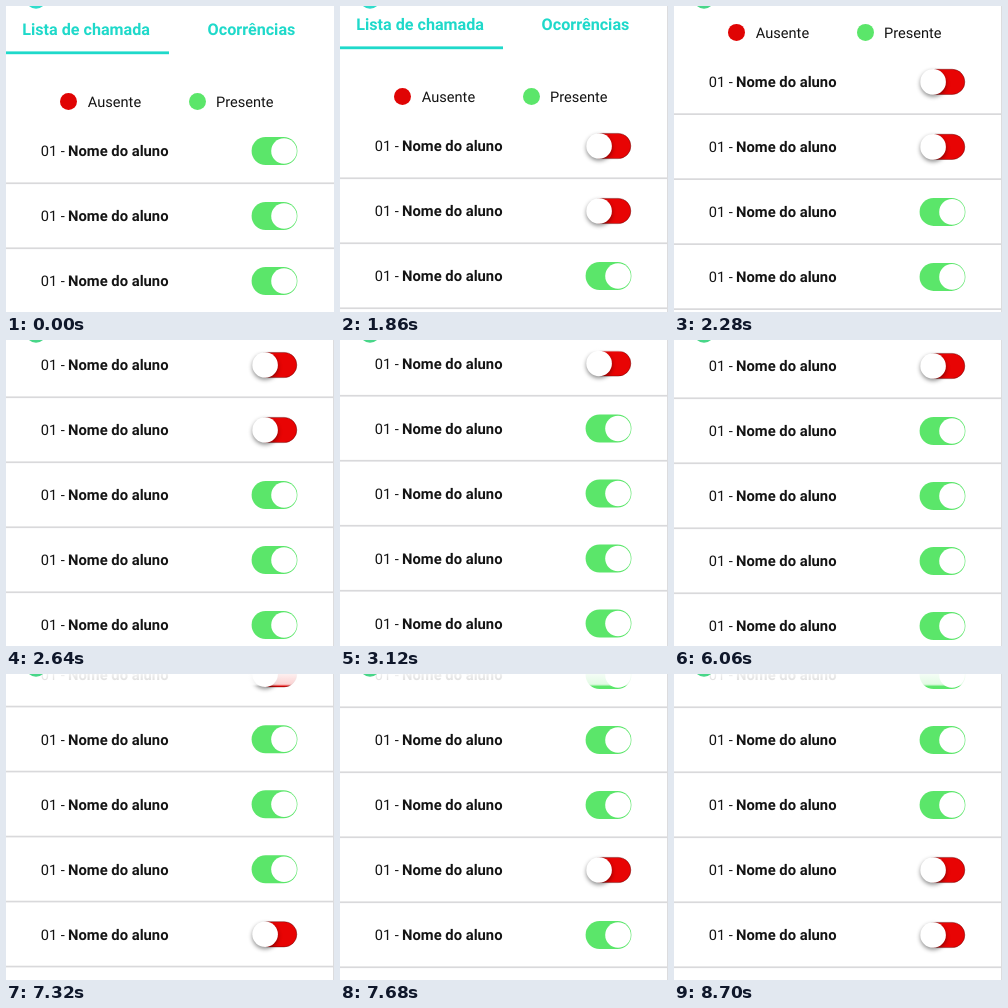
Write an HTML page that moves like this. It is 328 by 306 pixels and loops after 8760 ms.

```html
<!DOCTYPE html>
<html lang="pt">
<head>
<meta charset="utf-8">
<style>
  html, body { margin: 0; width: 100%; height: 100%; overflow: hidden; background: #fff; }
  svg { display: block; width: 328px; height: 306px; font: 14.6px Roboto, sans-serif; fill: #141414; text-rendering: geometricPrecision; }
  .name { font-size: 14.8px; font-weight: 700; }
  .tab { font-size: 16.15px; font-weight: 700; fill: #1fd9ca; }
</style>
</head>
<body>
<svg viewBox="0 0 328 306">
  <defs>
    <linearGradient id="fade" x2="0" y2="1">
      <stop offset="0" stop-color="#fff" stop-opacity=".94"/>
      <stop offset=".82" stop-color="#fff" stop-opacity=".82"/>
      <stop offset="1" stop-color="#fff" stop-opacity="0"/>
    </linearGradient>
  </defs>
  <g id="page">
    <text class="tab" x="16.2" y="28.6">Lista de chamada</text>
    <text class="tab" x="201.6" y="28.6">Ocorrências</text>
    <rect y="45.4" width="163" height="2.8" fill="#1fd9ca"/>
    <circle cx="62.5" cy="95.5" r="8.5" fill="#e00404"/>
    <text x="81.8" y="101">Ausente</text>
    <circle cx="191.5" cy="95.5" r="8.5" fill="#5be66a"/>
    <text x="210" y="101">Presente</text>
  </g>
  <rect width="328" height="12.5" fill="url(#fade)"/>
  <circle id="badge" cx="30" cy="-7.8" r="10.5"/>
  <rect id="edge" x="327" width="1" height="306" fill="#dcdcde"/>
</svg>
<script>
const LOOP = 8760, TICK = 60, ROWS = 9, PITCH = 65;
const GREEN = [91, 230, 106], RED = [232, 4, 4];

const ease = p => p * p * (3 - 2 * p);
const easeOut = p => 1 - (1 - p) ** 2;
const linear = p => p;

// time, scroll offset, easing towards this point
const scrollSteps = [
  [0, 0], [1800, 0], [1860, 5, linear], [2640, 120, ease], [2700, 121, linear],
  [3480, 238.5, ease], [6000, 238.5], [6060, 249, linear], [6120, 249],
  [6480, 270, easeOut], [7260, 270], [7320, 274.7, linear], [7680, 339, easeOut], [LOOP, 339]
];

// row: [start, end] of its switch to absent
const switches = { 0: [300, 600], 1: [1260, 1500], 2: [3720, 4020], 6: [6780, 7080], 7: [8100, 8460] };

const page = document.getElementById('page');
const badge = document.getElementById('badge');
const edge = document.getElementById('edge');

function add(parent, tag, attrs, text) {
  const el = document.createElementNS('http://www.w3.org/2000/svg', tag);
  for (const name in attrs) el.setAttribute(name, attrs[name]);
  if (text) el.textContent = text;
  return parent.appendChild(el);
}

const rows = Array.from({ length: ROWS }, (_, i) => {
  const g = add(page, 'g', { transform: `translate(0 ${145 + i * PITCH})` });
  add(g, 'text', { x: 34.8, y: 5.2 }, '01 -');
  add(g, 'text', { x: 62, y: 5.2, class: 'name' }, 'Nome do aluno');
  add(g, 'rect', { y: 31.4, width: 328, height: 1.7, fill: '#d9d9db' });
  const track = add(g, 'rect', { stroke: '#500', 'stroke-width': 0.7 });
  const knob = add(g, 'circle', { cy: 0, r: 12.8, fill: '#fff' });
  return { track, knob };
});

function scrollAt(t) {
  const i = Math.max(1, scrollSteps.findIndex(s => s[0] >= t));
  const [t0, a] = scrollSteps[i - 1], [t1, b, fn = linear] = scrollSteps[i];
  return a + (b - a) * fn((t - t0) / (t1 - t0));
}

function setSwitch({ track, knob }, p) {
  const color = GREEN.map((c, i) => Math.round(c + (RED[i] - c) * p));
  const left = 245.6 + 3.4 * p, right = 291.4 - 0.6 * p;
  const h = 28 - 2.8 * p;
  const box = {
    x: left, y: -h / 2, width: right - left, height: h, rx: h / 2,
    fill: `rgb(${color})`, 'stroke-opacity': 0.6 * p
  };
  for (const name in box) track.setAttribute(name, box[name]);
  knob.setAttribute('cx', 278 - 18.9 * p);
  knob.style.filter = p ? `drop-shadow(0.5px 2px 2px rgba(0,0,0,${0.45 * p}))` : 'none';
}

function draw(now) {
  const t = Math.floor((now % LOOP) / TICK) * TICK;
  page.setAttribute('transform', `translate(0 ${-scrollAt(t)})`);
  rows.forEach((row, i) => {
    const [from, to] = switches[i] || [LOOP, LOOP + 1];
    setSwitch(row, ease(Math.min(1, Math.max(0, (t - from) / (to - from)))));
  });
  badge.setAttribute('fill', t < 2100 ? '#2fdccb' : '#48d688');
  edge.setAttribute('visibility', t < 1860 ? 'hidden' : 'visible');
}

const start = performance.now();
function loop() {
  draw(performance.now() - start);
  requestAnimationFrame(loop);
}
loop();
</script>
</body>
</html>
```
